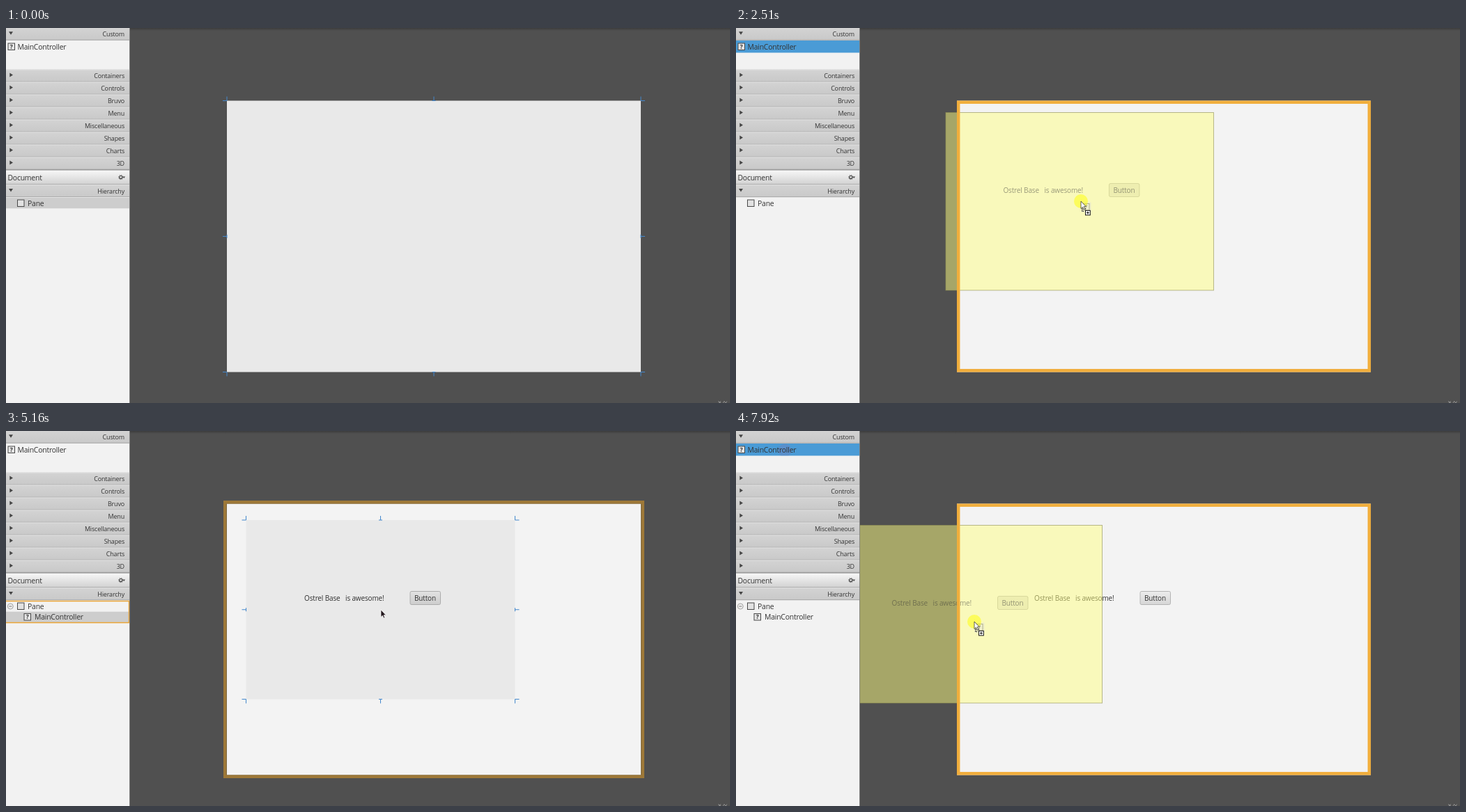
These frames come from a looping animation (1039x539 px, 8000 ms). An HTML page:

```html
<!DOCTYPE html>
<html lang="en">
<head>
<meta charset="utf-8">
<title>Layout editor</title>
<style>
  html, body { margin: 0; width: 100%; height: 100%; overflow: hidden; background: #505050; }
  svg { display: block; width: 1039px; height: 539px; }
  text { font-family: "Open Sans", "Noto Sans", sans-serif; font-size: 10.4px; letter-spacing: -.2px; fill: #333; }
  .head { font-size: 9px; letter-spacing: -.18px; text-anchor: end; }
  .form { font-size: 10px; letter-spacing: -.15px; }
  .mark { font-size: 8.5px; font-weight: 700; text-anchor: middle; letter-spacing: 0; }
</style>
</head>
<body>
<svg viewBox="0 0 1039 539">
  <defs>
    <linearGradient id="bar" x2="0" y2="1"><stop stop-color="#d3d3d3"/><stop offset="1" stop-color="#c9c9c9"/></linearGradient>
    <linearGradient id="doc" x2="0" y2="1"><stop stop-color="#f8f8f8"/><stop offset="1" stop-color="#d2d2d2"/></linearGradient>
    <linearGradient id="btn" x2="0" y2="1"><stop stop-color="#ececec"/><stop offset="1" stop-color="#d6d6d6"/></linearGradient>
    <linearGradient id="shade" x2="0" y2="1"><stop stop-color="#3c3c3c"/><stop offset="1" stop-color="#505050"/></linearGradient>
    <clipPath id="row"><rect y="18" width="177.5" height="17.5"/></clipPath>
    <g id="help">
      <rect x=".5" y=".5" width="9.5" height="9.5" fill="#e6e6e6" stroke="#484848"/>
      <text class="mark" x="5.3" y="8.4">?</text>
    </g>
  </defs>

  <rect width="1039" height="539" fill="#505050"/>
  <rect x="177" width="862" height="4" fill="url(#shade)"/>
  <path d="M1022 536.5l4 2.5M1026 536.5l-3 2.5M1029 539l2-3M1031 537l2 2 1.5-2.5" fill="none" stroke="#a5a5a5" stroke-width=".8"/>
  <rect x="317" y="104.5" width="594" height="390" fill="#f3f3f3"/>

  <g id="placed">
    <text class="form" x="428" y="244">Ostrel Base</text>
    <text class="form" x="487" y="244">is awesome!</text>
    <rect x="580" y="230.5" width="43.5" height="19" rx="2" fill="url(#btn)" stroke="#b4b4b4"/>
    <text class="form" x="586" y="244">Button</text>
  </g>
  <g id="rootSel"></g>
  <g id="childSel">
    <rect x="314.3" y="102.3" width="599.4" height="394.4" fill="none" stroke="#9d7838" stroke-width="4.6"/>
  </g>

  <g id="ghost">
    <rect x=".5" y=".5" width="384.5" height="255.5" fill="#ffff81" fill-opacity=".49" stroke="#8c8c50" stroke-opacity=".6"/>
    <rect x="235" y="102.5" width="43.5" height="19" rx="2" fill="#8a8a50" fill-opacity=".1" stroke="#8a8a50" stroke-opacity=".25"/>
    <g opacity=".48">
      <text class="form" x="83" y="116">Ostrel Base</text>
      <text class="form" x="142" y="116">is awesome!</text>
      <text class="form" x="241" y="116">Button</text>
    </g>
  </g>
  <rect id="target" x="319.2" y="106.7" width="589.6" height="385.6" fill="none" stroke="#f1ae3c" stroke-width="4.5"/>
  <g id="guideX" stroke="#a01024">
    <path d="M325.5 0V539" opacity=".42"/><path d="M325.5 109V490" stroke="#b01860" opacity=".35"/>
  </g>
  <g id="guideY" stroke="#a01024">
    <path d="M178 113.5H1039" opacity=".42"/><path d="M321 113.5H907" stroke="#b01860" opacity=".35"/>
  </g>

  <rect width="177.5" height="539" fill="#f2f2f2"/>
  <g id="bars"></g>
  <g id="picked">
    <rect y="18" width="177.5" height="17.5" fill="#4a9bd6"/>
    <circle id="trace" cx="70" cy="28" r="9.5" fill="#7a78b4" opacity=".32" clip-path="url(#row)"/>
  </g>
  <use href="#help" x="2.5" y="21.5"/>
  <text x="16.5" y="30.5">MainController</text>

  <rect y="204" width="177.5" height="20.5" fill="url(#doc)"/>
  <path d="M0 204H177.5" stroke="#858585"/><path d="M0 224.5H177.5" stroke="#b0b0b0"/>
  <text x="2.5" y="219">Document</text>
  <circle cx="164.8" cy="214.5" r="2" fill="none" stroke="#444" stroke-width="1.2"/>
  <circle cx="164.8" cy="214.5" r="3.1" fill="none" stroke="#444" stroke-width=".9" stroke-dasharray="1.2 1.23"/>
  <path d="M167.5 213.5h3.6l-1.8 2.4z" fill="#444"/>

  <rect id="rootRow" y="244" width="177.5" height="15.3" fill="#cdcdcd"/>
  <g id="childRow">
    <rect y="259.7" width="177" height="15.3" fill="#cdcdcd"/>
    <path d="M0 244.5H176.5V275.5H0" fill="none" stroke="#eaa536" stroke-width="1.4"/>
  </g>
  <rect x="16.5" y="247" width="9.5" height="9.5" fill="#e2e2e2" stroke="#484848"/>
  <text x="31" y="255.6">Pane</text>
  <g id="child">
    <circle cx="6.3" cy="252" r="4" fill="#ededed" stroke="#999" stroke-width=".9"/>
    <path d="M4.3 252h4" stroke="#777"/>
    <use href="#help" x="25.5" y="262"/>
    <text x="41" y="271">MainController</text>
  </g>
  <path d="M177.5 0V539" stroke="#777" stroke-width=".8"/>

  <g id="cursor">
    <g id="held">
      <g id="token"><rect x="-1.5" y="-1.5" width="14" height="14" fill="#dcdcdc"/><use href="#help"/></g>
      <circle r="10" fill="#ff0" opacity=".5"/>
      <path d="M1.5 10.5V14.5H5M3.5 10.5H6.5V13" fill="none" stroke="#222" stroke-dasharray="1.5 1"/>
      <rect x="6.5" y="13.3" width="6.8" height="6.6" fill="#fff" stroke="#111"/>
      <path d="M8 16.6H11.8M9.9 14.7V18.5" stroke="#111"/>
    </g>
    <path id="arrow" d="M0 0V10.5L2.4 8.3 4 12 5.7 11.2 4.1 7.7H7.3Z" stroke-width=".7"/>
  </g>
</svg>
<script>
const LOOP = 8000, LAG = 20, SNAP = 7;
const PRESS = 1250, RELEASE = 4610, DROP = 5160, PRESS2 = 7220;
const $ = id => document.getElementById(id);

// The screen refreshes in bursts: start, end, number of refreshes
const bursts = [
  [240, 930, 10], [1250, 2050, 11], [2120, 2900, 11], [2980, 3670, 10],
  [3980, 4230, 4], [4610, 4610, 1], [5160, 5160, 1], [5660, 6430, 11],
  [6520, 7050, 8], [7220, 7600, 6], [7600, 7920, 5]
];
const ticks = [0];
for (const [a, b, n] of bursts)
  for (let i = 0; i < n; i++) ticks.push(n > 1 ? Math.round(a + (b - a) * i / (n - 1)) : a);

// Pointer path: time, x, y
const path = [
  [240, 609, 406], [470, 420, 275], [700, 160, 95], [930, 68, 27], [1250, 68, 27],
  [1570, 170, 76], [1890, 300, 146], [1970, 330, 170], [2050, 352, 188], [2120, 374, 202],
  [2432, 487, 249], [2510, 495, 249], [2900, 524, 248], [3270, 548, 266], [3670, 523, 246],
  [3980, 525, 248], [4230, 538, 257], [5600, 538, 257], [5970, 867, 447], [6430, 110, 139],
  [6520, 108, 132], [7050, 69, 36], [7220, 70, 28], [7600, 193, 143], [7840, 306, 230],
  [7920, 342, 274]
];

function pointer(t) {
  const i = path.findIndex(k => k[0] > t);
  if (i === 0) return path[0].slice(1);
  if (i < 0) return path[path.length - 1].slice(1);
  const [a, ax, ay] = path[i - 1], [b, bx, by] = path[i];
  const p = (t - a) / (b - a);
  return [ax + (bx - ax) * p, ay + (by - ay) * p];
}

function header(y, h, label, open) {
  const m = y + h / 2 - 1;
  const tri = open ? `M4 ${m - 2}h6l-3 4.5z` : `M5.3 ${m - 3}v6l4.7 -3z`;
  return `<rect y="${y}" width="177.5" height="${h}" fill="url(#bar)"/>
    <path d="M0 ${y + .7}H177.5" stroke="#dedede"/>
    <path d="M0 ${y + h - .3}H177.5" stroke="#a6a6a6"/>
    <path d="${tri}" fill="#444"/>
    <text class="head" x="170" y="${y + h / 2 + 3.6}">${label}</text>`;
}

function selection(x, y, w, h) {
  let d = "";
  for (const u of [0, .5, 1]) for (const v of [0, .5, 1]) {
    if (u === .5 && v === .5) continue;
    const px = x + w * u, py = y + h * v;
    d += u === .5 ? `M${px - 2.5} ${py}h5` : `M${px} ${py}h${u ? 6 : -6}`;
    d += v === .5 ? `M${px} ${py - 2.5}v5` : `M${px} ${py}v${v ? 6 : -6}`;
  }
  return `<rect x="${x}" y="${y}" width="${w}" height="${h}" opacity=".045"/>
    <path d="${d}" fill="none" stroke="#4488cc"/>`;
}

const groups = ["Containers", "Controls", "Bruvo", "Menu", "Miscellaneous", "Shapes", "Charts", "3D"];
$("bars").innerHTML = header(-1, 18.5, "Custom", true) +
  groups.map((g, i) => header(59.5 + i * 18, 18, g)).join("") +
  header(225, 18, "Hierarchy", true);
$("rootSel").innerHTML = selection(317, 104.5, 594, 390);
$("childSel").innerHTML += selection(344.5, 128, 386, 257.5);

const show = (id, on) => $(id).setAttribute("display", on ? "inline" : "none");
const move = (id, x, y) => $(id).setAttribute("transform", `translate(${x} ${y})`);
const near = (a, b) => Math.abs(a - b) < SNAP;

function draw(time) {
  const t = ticks.filter(k => k <= time).pop();
  const [x, y] = pointer(t);
  const first = t >= PRESS && t < DROP, second = t >= PRESS2;
  const held = first && t < RELEASE || second;
  const over = (first || second) && x > 317 && y > 104;
  const placed = t >= DROP;

  show("picked", first || second);
  show("trace", second);
  show("rootSel", t < PRESS);
  show("rootRow", t < PRESS);
  show("placed", placed);
  show("child", placed);
  show("childSel", placed && !second);
  show("childRow", placed && !second);
  show("target", over);
  show("ghost", over);

  // The preview trails the pointer and sticks to margins
  const [gx, gy] = pointer(t - LAG);
  let left = gx - 192.5, top = gy - 128;
  const edge = near(left, 325.5), mid = near(gx, 325.5), high = near(top, 113.5);
  if (edge) left = 325.5;
  if (mid) left = 133;
  if (high) top = 113.5;
  move("ghost", left, top);
  show("guideX", over && (edge || mid));
  show("guideY", over && high);

  show("cursor", t >= 240);
  move("cursor", x, y);
  show("held", held);
  move("token", over ? 2 : -11, over ? 3 : -9.5);
  $("token").setAttribute("opacity", over ? .4 : .85);
  $("arrow").setAttribute("fill", held ? "#fff" : "#21161c");
  $("arrow").setAttribute("stroke", held ? "#222" : "#fff");
}

function loop(now) {
  draw(now % LOOP);
  requestAnimationFrame(loop);
}
draw(0);
requestAnimationFrame(loop);
</script>
</body>
</html>
```
